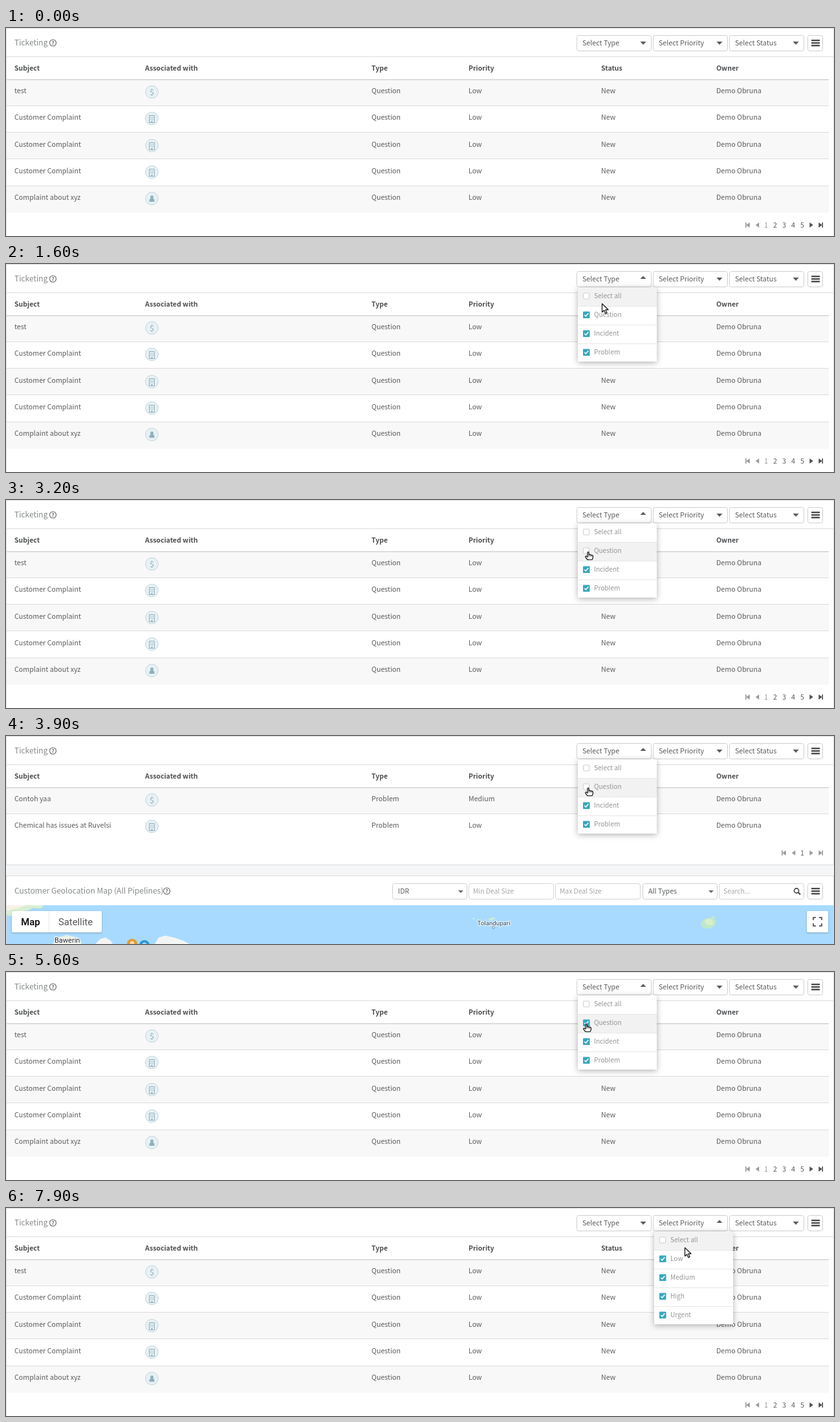
Recreate the animation shown at these times as an HTML page with a canvas. Size 1280 px wide and 322 px high, loop 8000 ms.

```html
<!DOCTYPE html>
<html lang="en">
<head>
<meta charset="utf-8">
<title>Ticketing table filters</title>
<style>
html, body { margin: 0; width: 100%; height: 100%; overflow: hidden; background: #fff; }
canvas { display: block; }
</style>
</head>
<body>
<canvas id="stage" width="1280" height="322"></canvas>
<script>
const ctx = document.getElementById('stage').getContext('2d');
const LOOP = 8000, STEP = 100;
const SANS = '"Noto Sans CJK JP", "Noto Sans CJK SC", "Noto Sans", sans-serif';
const ROBOTO = 'Roboto, sans-serif';
const INK = '#5a5c5e', DIM = '#9a9a9a', LINE = '#dcdcdc', TEAL = '#37a7bd';
const OWNER = 'Demo Obruna';
const COLUMNS = [13, 215, 565, 715, 920, 1098];
const HEADINGS = ['Subject', 'Associated with', 'Type', 'Priority', 'Status', 'Owner'];

const complaint = ['Customer Complaint', 'building', 'Question', 'Low', 'New'];
const ALL_TICKETS = [
  ['test', 'dollar', 'Question', 'Low', 'New'],
  complaint, complaint, complaint,
  ['Complaint about xyz', 'person', 'Question', 'Low', 'New']
];
const FILTERED_TICKETS = [
  ['Contoh yaa', 'dollar', 'Problem', 'Medium', 'New'],
  ['Chemical has issues at Ruvelsi', 'building', 'Problem', 'Low', 'New']
];

const TYPE_MENU = { x: 884, items: ['Select all', 'Question', 'Incident', 'Problem'], opens: 950, closes: 6945 };
const PRIORITY_MENU = { x: 1002, items: ['Select all', 'Low', 'Medium', 'High', 'Urgent'], opens: 7310, closes: Infinity };
const ROW = 29, MENU_TOP = 36, MENU_WIDTH = 122;

// Pointer path: time, tip x, tip y, shape
const POINTER = [
  [600, 943, 28, 'hand'], [900, 950, 23, 'hand'], [1400, 952, 36, 'hand'],
  [1500, 940, 46, 'arrow'], [1600, 921, 61, 'arrow'], [1700, 906, 88, 'hand'],
  [1800, 894, 114, 'hand'], [2000, 891, 107, 'hand'], [2100, 891, 107, 'hand'],
  [2400, 896, 97, 'hand'], [2800, 898, 97, 'hand'], [3000, 899, 80, 'hand'],
  [4000, 899, 80, 'hand'], [4400, 924, 80, 'hand'], [4500, 924, 80, 'hand'],
  [4800, 898, 85, 'hand'], [5300, 896, 80, 'hand'], [5600, 896, 80, 'hand'],
  [6100, 965, 26, 'hand'], [6200, 965, 26, 'hand'], [6400, 1068, 0, 'arrow'],
  [6600, 1068, 0, 'arrow'], [6800, 1052, 20, 'hand'], [7000, 1042, 29, 'hand'],
  [7500, 1048, 23, 'hand'], [7700, 1061, 32, 'hand'], [7800, 1061, 32, 'hand'],
  [7900, 1049, 61, 'arrow'], [8000, 1049, 61, 'arrow']
];

const clamp01 = v => Math.max(0, Math.min(1, v));

function text(str, x, y, { size = 10.7, color = INK, weight = 400, family = SANS, align = 'left', halo } = {}) {
  const baseline = Math.round(y + size * 0.37);
  ctx.font = `${weight} ${size}px ${family}`;
  ctx.textAlign = align;
  if (halo) {
    ctx.strokeStyle = halo;
    ctx.lineWidth = 2.5;
    ctx.lineJoin = 'round';
    ctx.strokeText(str, x, baseline);
  }
  ctx.fillStyle = color;
  ctx.fillText(str, x, baseline);
}

function rect(x, y, w, h, color) {
  ctx.fillStyle = color;
  ctx.fillRect(x, y, w, h);
}

function paint(fill, stroke, width = 1) {
  if (fill) { ctx.fillStyle = fill; ctx.fill(); }
  if (stroke) { ctx.strokeStyle = stroke; ctx.lineWidth = width; ctx.stroke(); }
}

function box(x, y, w, h, r, fill, stroke) {
  ctx.beginPath();
  ctx.roundRect(x, y, w, h, r);
  paint(fill, stroke);
}

function disc(x, y, r, fill, stroke, width) {
  ctx.beginPath();
  ctx.arc(x, y, r, 0, 7);
  paint(fill, stroke, width);
}

function ellipse(x, y, rx, ry, fill, turn = 0) {
  ctx.beginPath();
  ctx.ellipse(x, y, rx, ry, turn, 0, 7);
  paint(fill);
}

function polyline(points, fill, stroke, width) {
  ctx.beginPath();
  points.forEach(([x, y]) => ctx.lineTo(x, y));
  if (fill) ctx.closePath();
  paint(fill, stroke, width);
}

function softShadow(blur, dy, alpha) {
  ctx.shadowColor = `rgba(0,0,0,${alpha})`;
  ctx.shadowBlur = blur;
  ctx.shadowOffsetY = dy;
}

function select(x, y, label) {
  box(x + .5, y + .5, 115, 24, 3, '#fff', '#cfcfcf');
  text(label, x + 9, y + 12);
}

function filterSelect(x, label, open) {
  select(x, 11, label);
  const cx = x + 103;
  polyline(open
    ? [[cx - 4.5, 23], [cx + 4.5, 23], [cx, 18.5]]
    : [[cx - 4.5, 21], [cx + 4.5, 21], [cx, 26]], INK);
}

function plainSelect(x, y, label) {
  select(x, y, label);
  polyline([[x + 102, y + 11], [x + 110, y + 11], [x + 106, y + 15]], '#6a6a6a');
}

function input(x, y, placeholder) {
  box(x + .5, y + .5, 131, 24, 3, '#fff', '#d4d4d4');
  text(placeholder, x + 7, y + 12, { size: 10.3, color: '#a6a6a6' });
}

function menuButton(y) {
  box(1239.5, y + .5, 23, 24, 3, '#fff', '#cfcfcf');
  for (let i = 0; i < 3; i++) rect(1245, y + 7 + i * 4, 13, 2.4, '#4d4d4d');
}

function title(label, y, helpX) {
  text(label, 13, y, { size: 12, color: '#86898b' });
  disc(helpX, y, 5, null, '#626466', 1.1);
  text('?', helpX, y, { size: 8, weight: 700, color: '#626466', align: 'center' });
}

function badge(kind, y) {
  const x = 225.5, tone = '#8fb0bd';
  disc(x, y, 9.8, '#e9f1f4', '#bfd7df');
  if (kind === 'dollar') {
    text('$', x, y, { size: 12.5, color: tone, align: 'center' });
  } else if (kind === 'person') {
    disc(x, y - 2.3, 2.5, tone);
    box(x - 4, y, 8, 5, [3, 3, 1, 1], tone);
  } else {
    ctx.strokeStyle = tone;
    ctx.lineWidth = 1;
    ctx.strokeRect(x - 4, y - 4.5, 8, 11);
    for (let i = 0; i < 9; i++) rect(x - 2.5 + i % 3 * 2, y - 2.5 + (i / 3 | 0) * 2, 1, 1, tone);
    rect(x - 1, y + 4, 2, 2, tone);
  }
}

function pageArrow(x, y, dir, color, bar) {
  polyline([[x - 2.7 * dir, y - 4], [x + 2.7 * dir, y], [x - 2.7 * dir, y + 4]], color);
  if (bar) rect(x + 3.2 * dir - .8, y - 4, 1.6, 8, color);
}

function pagination(y, pages) {
  const first = 1231 - (pages - 1) * 14;
  const next = pages > 1 ? '#4d4f51' : DIM;
  pageArrow(first - 28, y, -1, DIM, true);
  pageArrow(first - 13.5, y, -1, DIM);
  for (let i = 0; i < pages; i++)
    text(i + 1, first + i * 14, y, { color: i || pages === 1 ? INK : DIM, align: 'center' });
  pageArrow(1245, y, 1, next);
  pageArrow(1259, y, 1, next, true);
}

function table(rows) {
  HEADINGS.forEach((h, i) => text(h, COLUMNS[i], 62, { size: 10.5, weight: 600, color: '#4c4e50' }));
  rows.forEach(([subject, icon, type, priority, status], i) => {
    const top = Math.round(79.5 + i * 41.25), y = Math.round(97 + i * 41.25);
    if (i % 2 === 0) rect(1, top, 1271, 41, '#f8f8f8');
    rect(1, top - 1, 1271, i ? 1 : 2, LINE);
    [subject, null, type, priority, status, OWNER].forEach((cell, c) => cell && text(cell, COLUMNS[c], y));
    badge(icon, y + 2);
  });
}

function map() {
  rect(1, 262, 1278, 60, '#a8daff');
  polyline([[1, 262], [59, 262], [54, 267], [42, 266], [34, 270], [22, 272], [12, 280], [1, 277]], '#d9efd3');
  polyline([[1, 262], [30, 262], [18, 267], [1, 270]], '#f6f3e6');
  polyline([[72, 322], [79, 312], [94, 308], [110, 312], [118, 322]], '#e6f2e2');
  polyline([[138, 322], [146, 314], [154, 312], [162, 317], [165, 322]], '#f3f4f1');
  polyline([[230, 322], [236, 312], [246, 309], [260, 312], [274, 317], [284, 322]], '#f3f5f3');
  disc(195, 322, 8, '#e39a2d');
  disc(195, 321, 3.5, '#f5d8a5');
  disc(214, 324, 8, '#2f95d8');
  disc(214, 323, 3.5, '#a8d5f1');
  text('Bawerin', 75, 315.5, { size: 11, color: '#26282a', family: ROBOTO, halo: '#fff' });

  ellipse(723, 283, 1.8, 1.2, '#c9ecd1');
  ellipse(751, 283, 5, 2, '#c9ecd1', -.3);
  text('Tolandupari', 754, 289, { size: 9.7, color: '#3f4f63', family: ROBOTO, align: 'center', halo: '#e2f2ff' });
  disc(753.5, 296.5, 1.7, '#fff', '#596b80', .9);
  ellipse(1086, 290, 12, 8, '#bfe8cb', -.25);
  ellipse(1087, 288, 7, 5, '#d8efc9', .3);
  ellipse(1093, 281, 3, 2, '#bfe8cb');

  ctx.save();
  softShadow(3, 1, .25);
  box(9, 271, 139, 33, 2, '#fff');
  box(1238, 271, 33, 33, 2, '#fff');
  ctx.restore();
  rect(66, 271, 1, 33, '#e8e8e8');
  text('Map', 38, 287.5, { size: 14.8, weight: 500, color: '#000', family: ROBOTO, align: 'center' });
  text('Satellite', 107.5, 287.5, { size: 14.8, color: '#565656', family: ROBOTO, align: 'center' });
  for (const sx of [-1, 1]) for (const sy of [-1, 1])
    polyline([[1254.5 + sx * 2.5, 287.5 + sy * 6.5], [1254.5 + sx * 6.5, 287.5 + sy * 6.5], [1254.5 + sx * 6.5, 287.5 + sy * 2.5]], null, '#666', 2);
}

function mapCard() {
  title('Customer Geolocation Map (All Pipelines)', 240, 248.5);
  plainSelect(597, 228, 'IDR');
  input(715, 228, 'Min Deal Size');
  input(849, 228, 'Max Deal Size');
  plainSelect(984, 228, 'All Types');
  input(1102, 228, 'Search...');
  disc(1222, 239.5, 3.6, null, '#444', 1.6);
  polyline([[1224.7, 242.2], [1228, 245.5]], null, '#444', 2);
  menuButton(228);
  map();
}

function cardGap() {
  rect(0, 199, 1280, 18, '#f5f6f8');
  rect(0, 199, 1280, 1, LINE);
  rect(0, 216, 1280, 1, LINE);
}

function checkbox(x, y, checked) {
  if (!checked) return box(x + .5, y - 4.5, 9, 9, 1, '#fff', '#cfcfcf');
  box(x, y - 5, 10.5, 10.5, 1, TEAL);
  polyline([[x + 2.2, y + .2], [x + 4.3, y + 2.4], [x + 8.3, y - 2.3]], null, '#fff', 1.5);
}

const isOpen = (menu, t) => t >= menu.opens && t < menu.closes;

// Shadow painted only outside the panel, so a fading panel stays white.
function panelShadow(x, y, w, h) {
  ctx.save();
  ctx.beginPath();
  ctx.rect(0, 0, 1280, 322);
  ctx.rect(x, y, w, h);
  ctx.clip('evenodd');
  softShadow(9, 2, .3);
  rect(x, y, w, h, '#fff');
  ctx.restore();
}

function dropdown(menu, t, pointer, isChecked) {
  const opening = clamp01((t - menu.opens) / 300);
  const closing = clamp01((t - menu.closes) / 225);
  const alpha = Math.sin(opening * Math.PI / 2) * (.5 + Math.cos(closing * Math.PI) / 2);
  if (alpha <= 0) return;
  const full = menu.items.length * ROW - 1;
  const height = Math.round(full * (1 - (1 - opening) ** 3));
  const inside = pointer && pointer.x > menu.x && pointer.x < menu.x + MENU_WIDTH;
  const hovered = inside ? Math.floor((pointer.y - MENU_TOP) / ROW) : -1;

  ctx.save();
  ctx.globalAlpha = alpha;
  panelShadow(menu.x, MENU_TOP, MENU_WIDTH, height);
  rect(menu.x, MENU_TOP, MENU_WIDTH, height, '#fff');
  ctx.beginPath();
  ctx.rect(menu.x, MENU_TOP, MENU_WIDTH, height);
  ctx.clip();
  menu.items.forEach((item, i) => {
    const top = MENU_TOP + i * ROW, y = top + 13.5;
    if (i === hovered) rect(menu.x, top, MENU_WIDTH, ROW, '#f2f2f2');
    if (i) rect(menu.x, top, MENU_WIDTH, 1, '#e8e8e8');
    checkbox(menu.x + 8, y, isChecked(i));
    text(item, menu.x + 25, y, { size: 10.1, weight: 300, color: '#969696' });
  });
  ctx.restore();
}

function pointerAt(t) {
  if (t < POINTER[0][0]) return null;
  const next = POINTER.findIndex(p => p[0] > t);
  const [t0, x0, y0, shape] = POINTER[next - 1], [t1, x1, y1] = POINTER[next];
  const u = (t - t0) / (t1 - t0);
  return { x: x0 + (x1 - x0) * u, y: y0 + (y1 - y0) * u, shape };
}

const ARROW = new Path2D('M.5 .5V13.5L3.6 10.7 5.8 15.6 8 14.6 5.8 9.8H10Z');
const HAND = new Path2D('M0 1Q1-.5 2 1V4.5Q3.4 3.6 4.2 5Q5.8 4.3 6.4 5.6Q8.3 5 8.4 7V9.5L7 12.5H0L-3.2 8.6Q-3.7 6.6-1.8 7L0 8.3Z');

function drawPointer({ x, y, shape }) {
  const path = shape === 'hand' ? HAND : ARROW;
  ctx.save();
  ctx.translate(Math.round(x), Math.round(y));
  ctx.lineJoin = 'round';
  ctx.lineWidth = 1.2;
  ctx.fillStyle = '#fff';
  ctx.strokeStyle = '#111';
  ctx.fill(path);
  ctx.stroke(path);
  if (shape === 'hand') for (const fx of [2, 4.2, 6.4]) rect(fx - .3, 5, .8, 2.5, '#111');
  ctx.restore();
}

function draw(t) {
  const filtered = t >= 3900 && t < 5600;
  const questionOff = t >= 3200 && t < 4900;
  const pointer = pointerAt(t);

  rect(0, 0, 1280, 322, '#fff');
  title('Ticketing', 23, 72.5);
  filterSelect(882, 'Select Type', isOpen(TYPE_MENU, t));
  filterSelect(1000, 'Select Priority', isOpen(PRIORITY_MENU, t));
  filterSelect(1118, 'Select Status', false);
  menuButton(11);
  rect(0, 44, 1280, 1, LINE);
  table(filtered ? FILTERED_TICKETS : ALL_TICKETS);
  if (filtered) {
    pagination(181, 1);
    mapCard();
  } else {
    pagination(305, 5);
  }
  rect(0, 0, 1280, 1, LINE);
  rect(0, 0, 1, 322, LINE);
  rect(1279, 0, 1, 322, LINE);
  if (filtered) cardGap();

  dropdown(TYPE_MENU, t, pointer, i => i > 1 || (i === 1 && !questionOff));
  dropdown(PRIORITY_MENU, t, pointer, i => i > 0);
  if (pointer) drawPointer(pointer);
}

function frame() {
  const t = performance.now() % LOOP;
  draw(Math.floor(t / STEP) * STEP);
  requestAnimationFrame(frame);
}
frame();
</script>
</body>
</html>
```
